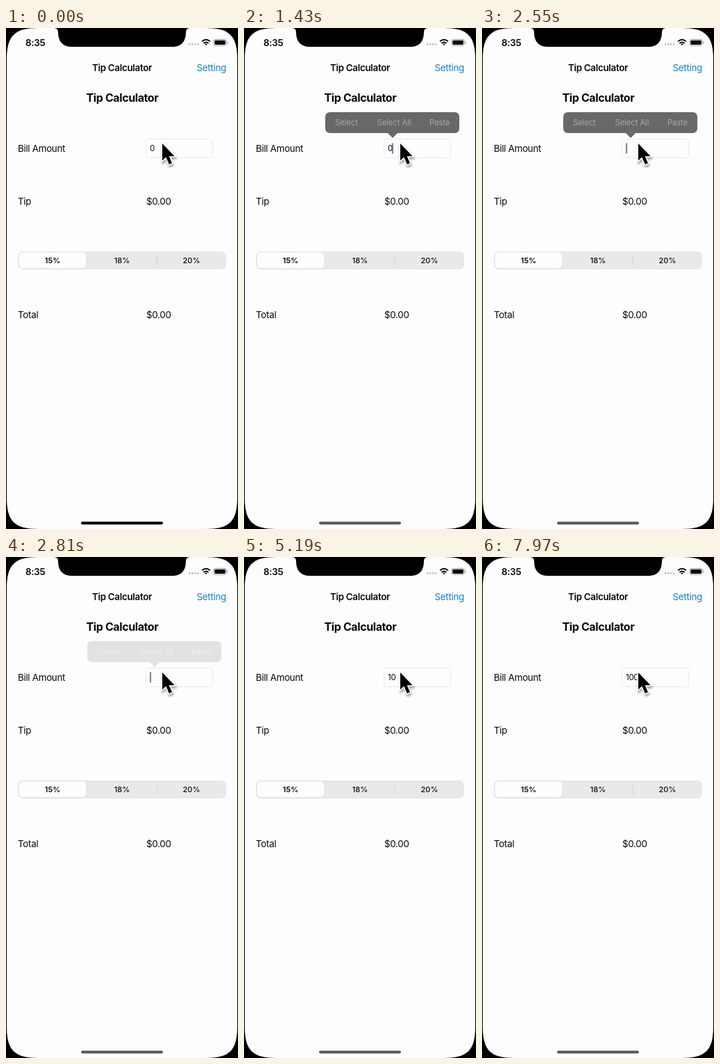
Write an HTML page that moves like this. It is 334 px wide and 720 px high and loops after 7.99 s.

```html
<!DOCTYPE html>
<html lang="en">
<head>
<meta charset="utf-8">
<title>Tip Calculator</title>
<style>
  :root { --paper: #fdfdfd; --ink: #080808; --loop: 7990ms; }
  html, body { margin: 0; width: 100%; height: 100%; overflow: hidden; background: #000; }
  svg { display: block; width: 100vw; height: 100vh; }
  text { font: 400 13.4px Inter, sans-serif; letter-spacing: -.3px; fill: var(--ink); white-space: pre; }
  .mid { text-anchor: middle; }
  .semi { font-weight: 600; }
  .heading { font-size: 16px; font-weight: 700; letter-spacing: -.4px; }
  .link { fill: #1683c9; text-anchor: end; }
  .seg text { font-size: 11px; font-weight: 500; letter-spacing: 0; text-anchor: middle; }
  .seg .on { font-weight: 600; }
  .entry { font-size: 11.5px; letter-spacing: -.3px; }
  .menu text { font-size: 11.2px; letter-spacing: -.05px; text-anchor: middle; fill: #a9a9a9; }
  .menu path { fill: #686868; }

  .timed { animation: var(--name) var(--loop) step-end infinite; opacity: 0; }
  .smooth { animation-timing-function: ease-in-out; }
  .zero { --name: zero; }
  .one { --name: one; }
  .ten { --name: ten; }
  .hundred { --name: hundred; }
  .focus { --name: focus; }
  .menu { --name: menu; }
  .loupe { --name: loupe; transform-origin: 213px 173px; }
  .spot { animation: spot var(--loop) step-end infinite; }
  .caret { fill: #46568f; animation: blink calc(var(--loop) / 8) linear -500ms infinite; }
  .home { animation: home var(--loop) linear infinite; }

  @keyframes zero { 0% { opacity: 1 } 30.54%, 100% { opacity: 0 } }
  @keyframes one { 0% { opacity: 0 } 58.82% { opacity: 1 } 64.46%, 100% { opacity: 0 } }
  @keyframes ten { 0% { opacity: 0 } 64.46% { opacity: 1 } 67.58%, 100% { opacity: 0 } }
  @keyframes hundred { 0% { opacity: 0 } 67.58%, 100% { opacity: 1 } }
  @keyframes focus { 0% { opacity: 0 } 5%, 100% { opacity: 1 } }
  @keyframes spot {
    0% { transform: translateX(213.2px) }
    30.54% { transform: translateX(207.2px) }
    58.82% { transform: translateX(212.4px) }
    64.46% { transform: translateX(219px) }
    67.58%, 100% { transform: translateX(225.6px) }
  }
  @keyframes blink { 0%, 33% { opacity: 1 } 50%, 80% { opacity: 0 } 92%, 100% { opacity: 1 } }
  @keyframes menu { 0%, 12.5% { opacity: 0 } 14.4%, 32.5% { opacity: 1 } 36.3%, 100% { opacity: 0 } }
  @keyframes loupe {
    0%, 6.5% { opacity: 0; transform: scale(.3) }
    8.5%, 11.3% { opacity: 1; transform: none }
    12.8%, 100% { opacity: 0; transform: scale(.3) }
  }
  @keyframes home { 0%, .4% { fill: #000 } 3%, 99.9% { fill: #585858 } 100% { fill: #000 } }
</style>
</head>
<body>
<svg viewBox="0 0 334 720" preserveAspectRatio="none">
  <defs>
    <radialGradient id="halo">
      <stop offset=".4" stop-color="#e6e6ea" stop-opacity=".7"/>
      <stop offset="1" stop-color="#f4f4f8" stop-opacity="0"/>
    </radialGradient>
    <filter id="soft" x="-50%" y="-50%" width="200%" height="200%"><feGaussianBlur stdDeviation="1.8"/></filter>
    <path id="arrow" d="M225 166V190.5L230.3 185.6L234.8 196L239 194.2L234.6 184.2H242.6Z"/>
  </defs>

  <!-- screen with continuous corners, then the notch -->
  <path fill="var(--paper)" d="M1 46C1 11 12 0 47 0H287C322 0 333 11 333 46V674C333 709 322 720 287 720H47C12 720 1 709 1 674Z"/>
  <path d="M69 0Q75 0 75 6C75 20 82 27 95 27H239C252 27 259 20 259 6Q259 0 265 0Z"/>

  <!-- status bar -->
  <text class="semi" x="28" y="25.6">8:35</text>
  <path d="M264.2 23.4H278" stroke="#b8b8b8" stroke-width="2.6" stroke-linecap="round" stroke-dasharray="0 4"/>
  <g fill="none" stroke="var(--ink)" stroke-width="2">
    <path d="M282.2 19.3Q288 14.2 293.8 19.3M284.5 22Q288 18.9 291.5 22"/>
    <path d="M286.3 23.2Q288 22 289.7 23.2L288 25.2Z" fill="var(--ink)" stroke="none"/>
  </g>
  <rect x="298.9" y="16.4" width="18.4" height="8.9" rx="2.6" fill="none" stroke="#a0a0a0"/>
  <rect x="300.3" y="17.8" width="15.6" height="6.1" rx="1.4" fill="var(--ink)"/>
  <rect x="318.3" y="19.3" width="1.2" height="3.2" rx=".6" fill="#a0a0a0"/>

  <text class="mid semi" x="167" y="62">Tip Calculator</text>
  <text class="link" x="317" y="62">Setting</text>
  <text class="mid heading" x="167.5" y="106">Tip Calculator</text>

  <text x="17" y="178">Bill Amount</text>
  <text x="17" y="254.3">Tip</text>
  <text x="202" y="254.3">$0.00</text>
  <text x="17" y="417">Total</text>
  <text x="202" y="417">$0.00</text>

  <g class="seg">
    <rect x="17" y="321" width="300" height="26" rx="7" fill="#e9e9e9"/>
    <rect x="18.2" y="322.4" width="98" height="24" rx="6" fill="#d6d6d6"/>
    <rect x="18.6" y="322.4" width="97" height="23.2" rx="5.6" fill="var(--paper)"/>
    <rect x="216.5" y="328" width="1" height="13" fill="#cfcfcf"/>
    <text class="on" x="67" y="338">15%</text>
    <text x="167" y="338">18%</text>
    <text x="267" y="338">20%</text>
  </g>

  <ellipse class="timed smooth loupe" cx="224" cy="132" rx="56" ry="44" fill="url(#halo)"/>
  <rect x="201.5" y="159.5" width="96" height="27" rx="4" fill="var(--paper)" stroke="#e9e9ee"/>
  <text class="entry timed zero" x="207" y="177.2">0</text>
  <text class="entry timed one" x="207" y="177.2">1</text>
  <text class="entry timed ten" x="207" y="177.2">10</text>
  <text class="entry timed hundred" x="207" y="177.2">100</text>
  <g class="timed focus"><g class="spot"><rect class="caret" y="165.5" width="1.5" height="15"/></g></g>

  <g class="timed smooth loupe">
    <rect x="200.5" y="119.5" width="55" height="32" rx="16" fill="var(--paper)" stroke="#f1f1f4"/>
    <text class="entry" x="207" y="145.6" style="fill:#555">0</text>
    <rect x="213.2" y="134" width="1.5" height="15" fill="#6a7391"/>
  </g>

  <g class="timed smooth menu">
    <path d="M124 121H303Q310 121 310 128V144Q310 151 303 151H221L214 158L207 151H124Q117 151 117 144V128Q117 121 124 121Z"/>
    <text x="147.5" y="140">Select</text>
    <text x="216" y="140">Select All</text>
    <text x="281.5" y="140">Paste</text>
  </g>

  <use href="#arrow" x="1" y="3" stroke="#000" stroke-width="3" opacity=".35" filter="url(#soft)"/>
  <use href="#arrow" stroke="var(--paper)" stroke-width="3.4" stroke-linejoin="round"/>
  <use href="#arrow"/>

  <rect class="home" x="108" y="709.5" width="118" height="4" rx="2"/>
</svg>
</body>
</html>
```
